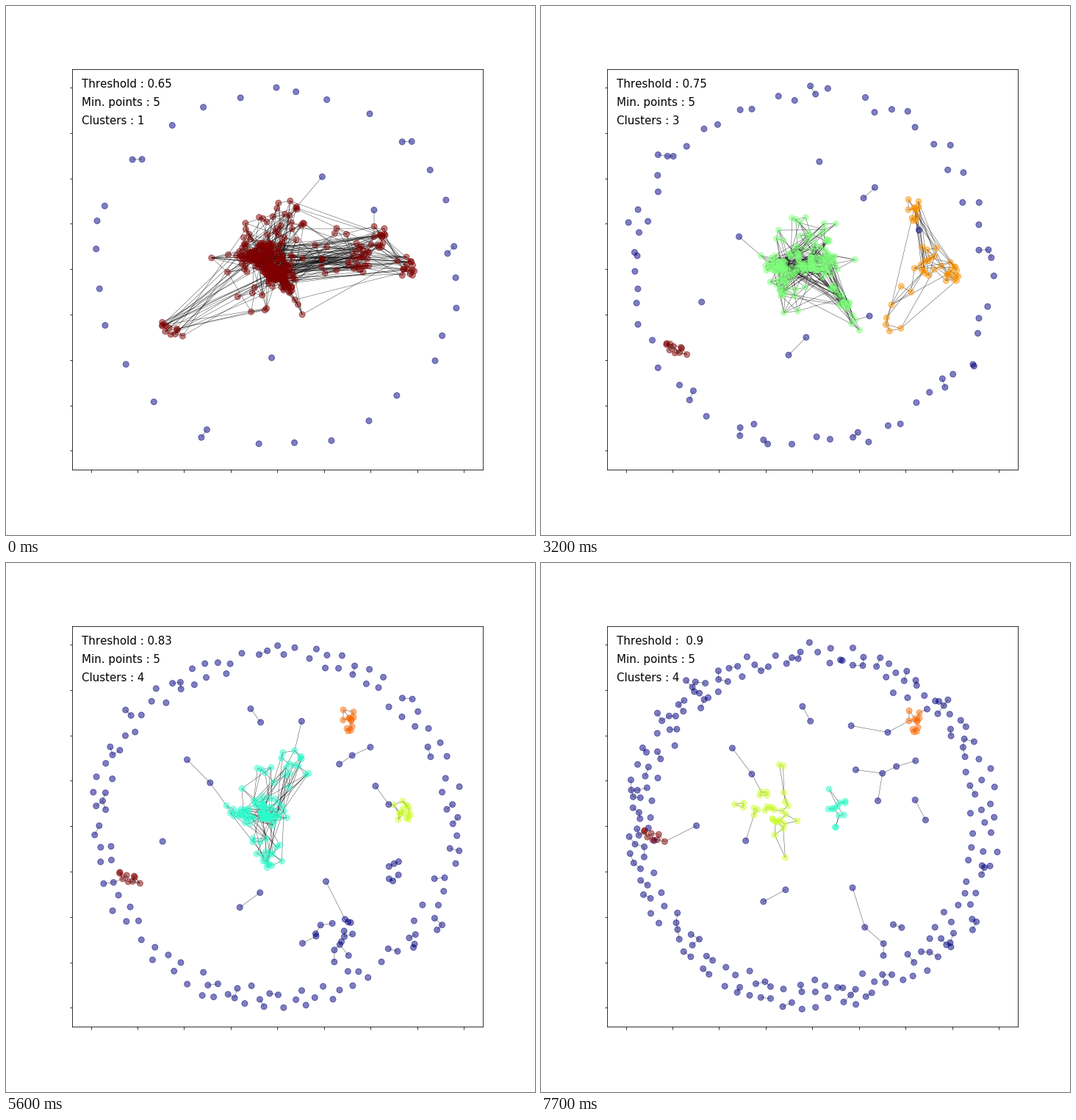
Recreate the animation shown at these times as a matplotlib script. Size 720 px wide and 720 px high, loop 8000 ms.

```python
import numpy as np
import matplotlib.pyplot as plt
from matplotlib.animation import FuncAnimation
from matplotlib.collections import LineCollection

SIZE, DPI = 720, 72
TICK_MS, LOOP_MS = 100, 8000
FIRST_MS, HOLD_MS = 500, 300
LAST_STEP = 25
CENTER, RADII = np.array([368, 357]), np.array([251, 246])
BOX = dict(left=90, right=649, top=86.4, bottom=631)

plt.rcParams["text.kerning_factor"] = 6
rng = np.random.default_rng(12)


def polar(angle, radius):
    return np.c_[np.cos(angle), np.sin(angle)] * np.reshape(radius, (-1, 1))


class Group:
    """A blob of nodes that glides along a path and joins its parent's cluster until it splits."""

    def __init__(self, name, path, size, count, parent=None, split=0,
                 life=(0, LAST_STEP), noise=LAST_STEP + 1, shear=0.0):
        self.name, self.parent, self.split = name, parent, split
        self.path, self.size, self.count = np.array(path, float), size, count
        self.life, self.noise, self.shear = life, noise, shear
        total = max(count)
        radius = np.minimum(rng.rayleigh(1.05, total), 2.3)
        self.unit = polar(rng.uniform(0, 2 * np.pi, total), radius)
        self.picks = rng.random((total, 2))

    def alive(self, step):
        return self.life[0] <= step <= self.life[1]

    def cluster(self, step):
        if step >= self.noise:
            return None
        return self.parent if step < self.split else self.name

    def at(self, step):
        part = (step - self.life[0]) / max(1, self.life[1] - self.life[0])
        stops = np.linspace(0, 1, len(self.path))
        center = [np.interp(part, stops, axis) for axis in self.path.T]
        u, v = self.unit[:round(np.interp(part, (0, 1), self.count))].T * np.reshape(self.size, (2, 1))
        return center + np.c_[u, v + self.shear * u]


# listed in the order in which clusters are numbered
groups = [
    Group("late", [(402, 332)], (9, 12), (12, 12), life=(25, 25)),
    Group("core", [(342, 338), (328, 352), (338, 352), (333, 337), (292, 327)], (15, 8), (80, 13)),
    Group("hub", [(373, 364), (377, 358), (386, 345), (358, 338), (328, 343)], (10, 8), (62, 14), "core", 99),
    Group("tail", [(380, 382), (402, 400), (435, 413)], (11, 6), (20, 24), "core", 99, (0, 16), shear=1.4),
    Group("foot", [(357, 354), (350, 362), (314, 380), (355, 394), (350, 402)], (10, 11), (28, 13),
          "core", 99, (0, 24)),
    Group("halo", [(350, 348), (350, 345), (345, 352), (348, 338), (330, 335)], (35, 31), (62, 6), "core", 99),
    Group("crown", [(388, 288), (374, 337), (386, 330), (394, 278), (402, 235)], (10, 13), (12, 15),
          "core", 20, (0, 24)),
    Group("east", [(547, 360), (555, 391), (562, 350), (538, 341)], (9, 8), (14, 14), "core", 3, (0, 19)),
    Group("spread", [(455, 335), (492, 402), (498, 424)], (18, 17), (10, 6), "east", 99, (0, 13)),
    Group("north", [(505, 311), (510, 284), (500, 268), (458, 203), (505, 212)], (7, 8), (13, 11), "east", 12),
    Group("south", [(407, 573)], (7, 7), (8, 8), life=(20, 24)),
    Group("west", [(225, 440), (185, 470), (182, 462), (165, 422), (153, 370)], (9, 6), (11, 8), "core", 5),
    Group("bridge", [(484, 343), (517, 331), (532, 360), (523, 424)], (8, 12), (24, 5), "east", 13,
          (0, 19), noise=17),
    Group("far", [(545, 317)], (13, 4), (9, 9), life=(20, 24)),
    Group("loose", [(448, 515), (470, 505)], (22, 16), (17, 5), life=(17, 25), noise=0),
]
by_name = {g.name: g for g in groups}


def ring_count(step):
    return round(33 + 1.5 * step + 0.22 * step ** 2)


def grow_ring(total):
    """Place nodes far from their neighbours; the rim thickens and some nodes come in pairs."""
    points = [CENTER + RADII * (0, -1)]
    while len(points) < total:
        n = len(points)
        if n % 7 == 0:
            points.append(points[rng.integers(n)] + 13 * polar(rng.uniform(0, 6.28), 1)[0])
            continue
        inner = 0.96 - 0.11 * n / total
        spots = CENTER + RADII * polar(rng.uniform(0, 2 * np.pi, 14), rng.uniform(inner, 1.01, 14))
        gaps = np.linalg.norm(spots[:, None] - np.array(points), axis=2).min(axis=1)
        points.append(spots[gaps.argmax()])
    return np.array(points)


ring = grow_ring(ring_count(LAST_STEP))
ring_phase = rng.uniform(0, 2 * np.pi, ring.shape)
stray_angle = rng.uniform(0, 2 * np.pi, 20)
stray_radius = rng.uniform(0.33, 0.7, 20)


def ring_at(step):
    drift = 2.5 * (np.sin(ring_phase + 0.3 * step) - np.sin(ring_phase))
    return (ring + drift)[:ring_count(step)]


def strays_at(step):
    count = round(3 + 0.6 * step)
    spots = CENTER + RADII * polar(stray_angle + 0.02 * step, stray_radius)
    return spots[:count]


def find_links(pts, labels, reach, picks, step):
    """Tie nodes to their nearest cluster mates, plus random mates that favour short ways."""
    dist = np.linalg.norm(pts[:, None] - pts, axis=2)
    np.fill_diagonal(dist, np.inf)
    longer = 2 if step < 12 else 1 if step < 22 else 0
    pairs = set()
    for i, label in enumerate(labels):
        if label == 0:
            j = dist[i].argmin()
            ends = [j] if dist[i, j] < reach[i] else []
        else:
            mates = np.flatnonzero(labels == label)
            mates = mates[dist[i, mates].argsort()][:-1]
            ends = [*mates[:2], *mates[(picks[i, :longer] ** 2.5 * len(mates)).astype(int)]]
        pairs.update((min(i, j), max(i, j)) for j in ends)
    return [pts[[i, j]] for i, j in sorted(pairs)]


def layout(step):
    living = [g for g in groups if g.alive(step)]
    owner = {}
    for g in living:
        name = g.cluster(step)
        while name and by_name[name].cluster(step) != name:
            name = by_name[name].cluster(step)
        owner[g.name] = name
    clusters = [g.name for g in living if owner[g.name] == g.name]

    blocks = [(ring_at(step), 0, 14, None)]
    for g in living:
        name = owner[g.name]
        blocks.append((g.at(step), clusters.index(name) + 1 if name else 0, 40, g.picks))
    blocks.append((strays_at(step), 0, 60, None))

    pts = np.vstack([b[0] for b in blocks])
    sizes = [len(b[0]) for b in blocks]
    labels = np.repeat([b[1] for b in blocks], sizes)
    reach = np.repeat([b[2] for b in blocks], sizes)
    picks = np.vstack([np.zeros((n, 2)) if b[3] is None else b[3][:n] for b, n in zip(blocks, sizes)])
    shade = np.where(labels > 0, (labels + 1) / (len(clusters) + 1), 0.0)
    return pts, plt.cm.jet(shade, alpha=0.5), find_links(pts, labels, reach, picks, step), len(clusters)


fig = plt.figure(figsize=(SIZE / DPI, SIZE / DPI), dpi=DPI, facecolor="white")
ax = fig.add_axes([BOX["left"] / SIZE, 1 - BOX["bottom"] / SIZE,
                   (BOX["right"] - BOX["left"]) / SIZE, (BOX["bottom"] - BOX["top"]) / SIZE])
ax.set(xlim=(BOX["left"], BOX["right"]), ylim=(BOX["bottom"], BOX["top"]),
       xticks=115.5 + 63.45 * np.arange(9), yticks=111 + 61.8 * np.arange(9))
ax.tick_params(labelbottom=False, labelleft=False)

lines = LineCollection([], colors="black", linewidths=0.5, alpha=0.7, zorder=1)
ax.add_collection(lines, autolim=False)
nodes = ax.scatter([], [], s=64, linewidths=1, edgecolors="face", zorder=2)
captions = [ax.text(103, y, "", fontsize=15, family="DejaVu Sans", va="baseline", zorder=3)
            for y in (111, 136, 161)]


def draw(frame):
    step = max(0, (frame * TICK_MS - FIRST_MS + HOLD_MS) // HOLD_MS)
    pts, colors, segments, total = layout(step)
    lines.set_segments(segments)
    nodes.set_offsets(pts)
    nodes.set_facecolor(colors)
    threshold = round(0.65 + 0.01 * step, 2)
    texts = (f"Threshold : {threshold:>4}", "Min. points : 5", f"Clusters : {total}")
    for caption, text in zip(captions, texts):
        caption.set_text(text)
    return [lines, nodes, *captions]


anim = FuncAnimation(fig, draw, frames=LOOP_MS // TICK_MS, interval=TICK_MS,
                     repeat=True, repeat_delay=0)
plt.show()
```
